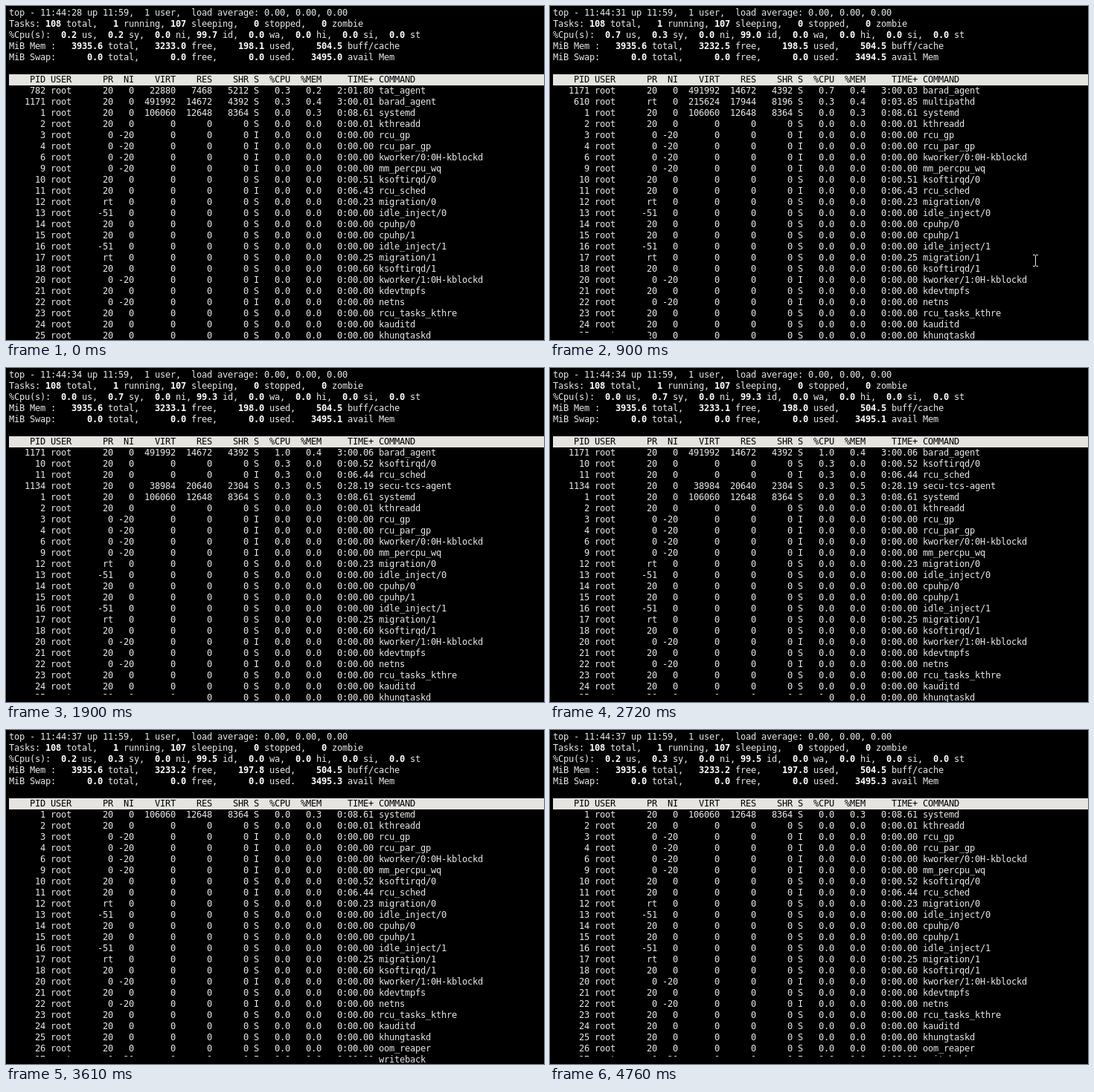
Animation, 723 px wide and 450 px high, one loop 5.27 s. Source, as an HTML page:

```html
<!DOCTYPE html>
<html lang="en">
<head>
<meta charset="utf-8">
<title>top</title>
<style>
  html, body { margin: 0; width: 100%; height: 100%; overflow: hidden; background: #000; }
  #stage { position: relative; width: 723px; height: 450px; overflow: hidden; background: #000; }
  .screen { position: absolute; inset: 0; visibility: hidden; }
  .row, #probe {
    position: absolute; left: 4px; height: 15px; margin: 0; white-space: pre;
    font: 12px/14px "DejaVu Sans Mono", "Liberation Mono", monospace; color: #e8e8e8;
  }
  .row b { color: #fff; }
  .head { width: 719px; background: #e6e4e0; color: #000; }
  #bar { position: absolute; left: 0; top: 440px; height: 10px; background: #000; }
  #cursor { position: absolute; left: 0; top: 0; visibility: hidden; }
  #probe { visibility: hidden; }
</style>
</head>
<body>
<div id="stage">
  <div id="bar"></div>
  <svg id="cursor" width="7" height="16" shape-rendering="crispEdges">
    <path d="M0 .5H3M4 .5H7M3.5 1V15M0 15.5H3M4 15.5H7" stroke="#e8e8e8" fill="none"/>
  </svg>
  <span id="probe"></span>
</div>
<script>
const LOOP = 5270, CELL = 7, LINE = 15, TOP = 2, ROWS = 23;
const stage = document.getElementById('stage');
const bar = document.getElementById('bar');
const cursor = document.getElementById('cursor');
const probe = document.getElementById('probe');

// Keep every glyph on the terminal's 7px grid.
probe.textContent = '0'.repeat(100);
stage.style.letterSpacing = (CELL - probe.getBoundingClientRect().width / 100) + 'px';
probe.remove();

// pid pr ni state time command
const IDLE = `2 20 0 S 0:00.01 kthreadd
3 0 -20 I 0:00.00 rcu_gp
4 0 -20 I 0:00.00 rcu_par_gp
6 0 -20 I 0:00.00 kworker/0:0H-kblockd
9 0 -20 I 0:00.00 mm_percpu_wq
10 20 0 S 0:00.51 ksoftirqd/0
11 20 0 I 0:06.43 rcu_sched
12 rt 0 S 0:00.23 migration/0
13 -51 0 S 0:00.00 idle_inject/0
14 20 0 S 0:00.00 cpuhp/0
15 20 0 S 0:00.00 cpuhp/1
16 -51 0 S 0:00.00 idle_inject/1
17 rt 0 S 0:00.25 migration/1
18 20 0 S 0:00.60 ksoftirqd/1
20 0 -20 I 0:00.00 kworker/1:0H-kblockd
21 20 0 S 0:00.00 kdevtmpfs
22 0 -20 I 0:00.00 netns
23 20 0 S 0:00.00 rcu_tasks_kthre
24 20 0 S 0:00.00 kauditd
25 20 0 S 0:00.00 khungtaskd
26 20 0 S 0:00.00 oom_reaper
27 0 -20 I 0:00.00 writeback`.split('\n').map(line => {
  const [pid, pr, ni, state, time, cmd] = line.split(' ');
  return [pid, 'root', pr, ni, '0', '0', '0', state, '0.0', '0.0', time, cmd];
});
const SYSTEMD = '1 root 20 0 106060 12648 8364 S 0.0 0.3 0:08.61 systemd'.split(' ');
const HEAD = 'PID USER PR NI VIRT RES SHR S %CPU %MEM TIME+ COMMAND'.split(' ');

const SNAPS = [
  { at: 0, clock: '28', us: '0.2', sy: '0.2', id: '99.7',
    free: '3233.0', used: '198.1', avail: '3495.0', times: {},
    busy: ['782 root 20 0 22880 7468 5212 S 0.3 0.2 2:01.80 tat_agent',
           '1171 root 20 0 491992 14672 4392 S 0.3 0.4 3:00.01 barad_agent'] },
  { at: 190, clock: '31', us: '0.7', sy: '0.3', id: '99.0',
    free: '3232.5', used: '198.5', avail: '3494.5', times: {},
    busy: ['1171 root 20 0 491992 14672 4392 S 0.7 0.4 3:00.03 barad_agent',
           '610 root rt 0 215624 17944 8196 S 0.3 0.4 0:03.85 multipathd'] },
  { at: 1800, clock: '34', us: '0.0', sy: '0.7', id: '99.3',
    free: '3233.1', used: '198.0', avail: '3495.1', times: {},
    busy: ['1171 root 20 0 491992 14672 4392 S 1.0 0.4 3:00.06 barad_agent',
           '10 root 20 0 0 0 0 S 0.3 0.0 0:00.52 ksoftirqd/0',
           '11 root 20 0 0 0 0 I 0.3 0.0 0:06.44 rcu_sched',
           '1134 root 20 0 38984 20640 2304 S 0.3 0.5 0:28.19 secu-tcs-agent'] },
  { at: 3510, clock: '37', us: '0.2', sy: '0.3', id: '99.5',
    free: '3233.2', used: '197.8', avail: '3495.3',
    times: { 10: '0:00.52', 11: '0:06.44' }, busy: [] }
];

const WIDTHS = [7, 0, 3, 4, 8, 7, 7, 2, 6, 6, 10];
const format = cells => cells.map((c, i) =>
  i === 1 ? ' ' + c.padEnd(9) : i === 11 ? ' ' + c : c.padStart(WIDTHS[i])).join('');

function summary(s) {
  const pct = v => v.padStart(5), mem = v => v.padStart(9);
  return [
    'Tasks: 108 total,   1 running, 107 sleeping,   0 stopped,   0 zombie',
    `%Cpu(s):${pct(s.us)} us,${pct(s.sy)} sy,  0.0 ni,${pct(s.id)} id,  0.0 wa,  0.0 hi,  0.0 si,  0.0 st`,
    `MiB Mem :${mem('3935.6')} total,${mem(s.free)} free,${mem(s.used)} used,${mem('504.5')} buff/cache`,
    `MiB Swap:${mem('0.0')} total,${mem('0.0')} free,${mem('0.0')} used.${mem(s.avail)} avail Mem`
  ].map(line => line.replace(/\d+(\.\d+)?/g, '<b>$&</b>'));
}

function processes(s) {
  const busy = s.busy.map(line => line.split(' '));
  const shown = new Set(busy.map(p => p[0]));
  const idle = IDLE.filter(p => !shown.has(p[0])).map(p => {
    const row = p.slice();
    row[10] = s.times[p[0]] || p[10];
    return row;
  });
  return [...busy, SYSTEMD, ...idle].slice(0, ROWS).map(format);
}

function buildScreen(s) {
  const el = document.createElement('div');
  el.className = 'screen';
  const lines = [
    `top - 11:44:${s.clock} up 11:59,  1 user,  load average: 0.00, 0.00, 0.00`,
    ...summary(s), '', format(HEAD), ...processes(s)
  ];
  el.innerHTML = lines.map((line, i) =>
    `<div class="row${i === 6 ? ' head' : ''}" style="top:${TOP + i * LINE}px">${line}</div>`).join('');
  stage.insertBefore(el, bar);
  return el;
}
const screens = SNAPS.map(buildScreen);

// time, x, y of the pointer; it leaves at the last entry
const POINTER = [[710, 716, 362], [800, 684, 348], [900, 649, 335],
                 [1000, 684, 342], [1100, 716, 350], [1510]];

const lastAt = (list, t, time) => list.reduce((hit, item, i) => time(item) <= t ? i : hit, -1);

function draw() {
  const t = performance.now() % LOOP;

  const current = lastAt(SNAPS, t, s => s.at);
  screens.forEach((el, i) => { el.style.visibility = i === current ? 'visible' : 'hidden'; });

  // The black progress strip advances one 54th of the width per tick.
  const tick = Math.floor((t + 12) / 100.6);
  bar.style.width = (tick + 1) * 723 / 54 + 'px';

  const spot = POINTER[lastAt(POINTER, t, p => p[0])];
  const visible = spot && spot.length > 1;
  cursor.style.visibility = visible ? 'visible' : 'hidden';
  if (visible) cursor.style.transform = `translate(${spot[1]}px, ${spot[2]}px)`;

  requestAnimationFrame(draw);
}
draw();
</script>
</body>
</html>
```
